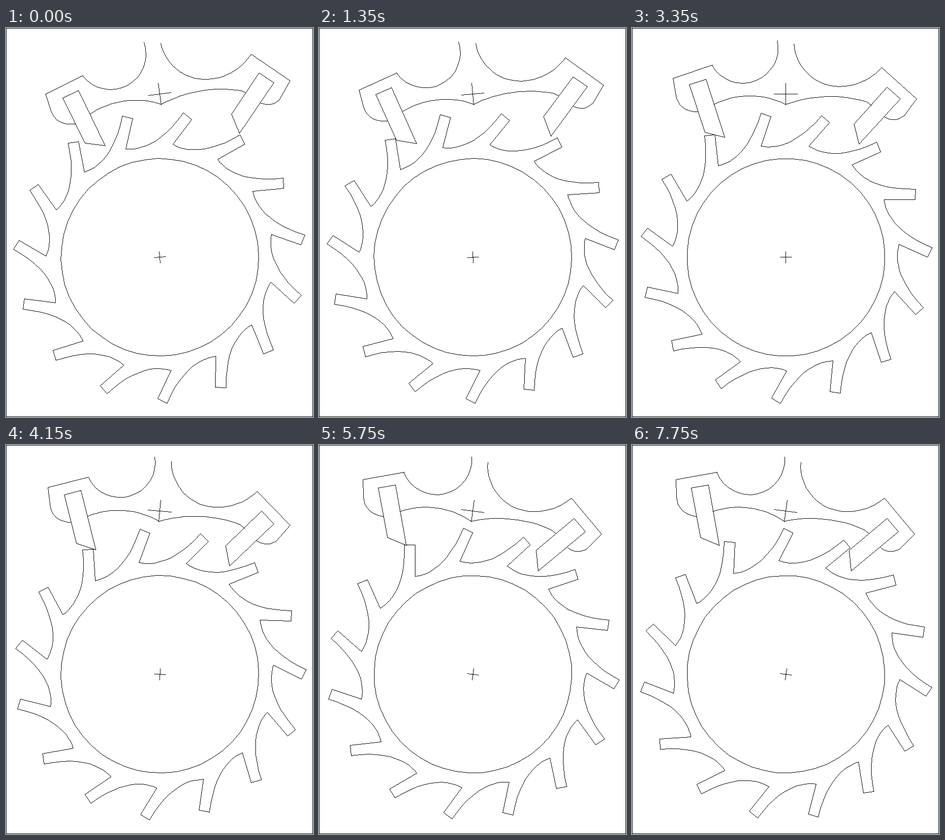
Animation, 624 px wide and 792 px high, one loop 8 s. Source, as an HTML page with a canvas:

```html
<!DOCTYPE html>
<html lang="en">
<head>
<meta charset="utf-8">
<title>Anchor escapement</title>
<style>
  html, body { margin: 0; width: 100%; height: 100%; overflow: hidden; background: #fff; }
  canvas { display: block; }
</style>
</head>
<body>
<canvas id="stage" width="624" height="792"></canvas>
<script>
const ctx = document.getElementById('stage').getContext('2d');
const LOOP = 8000, STEP = 400, FIRST_STEP = 150;
const TEETH = 15, PITCH = 360 / TEETH;
const AXLE = [312.4, 466.4], PIVOT = [312, 134];

const radians = degrees => degrees * Math.PI / 180;

function rotate([x, y], degrees) {
  const c = Math.cos(radians(degrees)), s = Math.sin(radians(degrees));
  return [x * c - y * s, x * s + y * c];
}

function sample(count, pointAt) {
  return Array.from({ length: count + 1 }, (_, i) => pointAt(i / count));
}

function arc(cx, cy, r, from, to, count = 16) {
  return sample(count, t => {
    const [x, y] = rotate([r, 0], from + (to - from) * t);
    return [cx + x, cy + y];
  });
}

// Bezier curve of any degree, by repeated interpolation
function bezier(...controls) {
  return sample(12, t => {
    let points = controls;
    while (points.length > 1) {
      points = points.slice(1).map(([x, y], i) => {
        const [px, py] = points[i];
        return [px + (x - px) * t, py + (y - py) * t];
      });
    }
    return points[0];
  });
}

const closed = points => [...points, points[0]];

function cross(x, y, w, h) {
  return [[[x - w, y], [x + w, y]], [[x, y - h], [x, y + h]]];
}

// Wheel, relative to its axle: the tip, the straight face, the hollow to the next tip
const tip = [263.4, -138.9];
const tooth = [
  tip, [263, -117.6],
  ...bezier([199.5, -117.5], [203, -89.9], [222.8, -50.3], rotate(tip, PITCH))
];
const wheel = [
  arc(0, 0, 201, 3.75, 363.75, 48),
  ...cross(0, 0, 11.5, 11.5),
  ...Array.from({ length: TEETH }, (_, k) => tooth.map(p => rotate(p, k * PITCH)))
];

// Anchor, in stage coordinates at rest
const anchor = [
  [
    ...arc(224.6, 40.2, 71.7, -12, 150.6), [163, 75], [82.6, 102],
    ...bezier([88.5, 137], [95, 169], [133, 170])
  ],
  [
    ...arc(421, 26, 92.5, 176.3, 90), ...arc(421, 3.2, 115.3, 90, 41.8), [578, 144],
    ...bezier([552.5, 178], [534, 193], [512, 180])
  ],
  arc(239, 303, 165, 243.7, 296.3),
  [...arc(402, 399, 260, 249.75, 286.8), [485.5, 156.5]],
  closed([[115.8, 114.6], [149.7, 103.7], [187.8, 222.2], [148, 211.7]]),
  closed([[518.3, 120], [545, 143.5], [461, 236], [450.5, 195]]),
  ...cross(...PIVOT, 23.6, 22)
].map(line => line.map(([x, y]) => [x - PIVOT[0], y - PIVOT[1]]));

// Steps passed within a span
const during = (step, from, to) => Math.min(Math.max(step - from, 0), to - from);

// The wheel rests while the anchor swings back
const wheelAngle = step => -5 + during(step, 0, 2) + during(step, 6, 18);

// The anchor swings freely, is pushed by a tooth, slips twice, then turns back
const anchorAngle = step => -8 + during(step, 2, 8) - during(step, 18, 20)
  + 2 * (during(step, 8, 12) + during(step, 13, 14) + during(step, 15, 16));

// One-pixel line without antialiasing
function drawLine([x0, y0], [x1, y1]) {
  const dx = x1 - x0, dy = y1 - y0;
  const count = Math.max(Math.abs(dx), Math.abs(dy), 1);
  for (let i = 0; i <= count; i++) {
    ctx.fillRect(Math.round(x0 + dx * i / count), Math.round(y0 + dy * i / count), 1, 1);
  }
}

function drawPart(lines, [cx, cy], degrees) {
  for (const line of lines) {
    const points = line.map(p => {
      const [x, y] = rotate(p, degrees);
      return [Math.round(cx + x), Math.round(cy + y)];
    });
    for (let i = 1; i < points.length; i++) drawLine(points[i - 1], points[i]);
  }
}

function draw(step) {
  ctx.fillStyle = '#000';
  ctx.fillRect(0, 0, 624, 792);
  ctx.fillStyle = '#fff';
  ctx.fillRect(1, 1, 622, 790);
  ctx.fillStyle = '#000';
  drawPart(wheel, AXLE, wheelAngle(step));
  drawPart(anchor, PIVOT, anchorAngle(step));
}

let shown = -1;
const start = performance.now();
function tick() {
  const time = (performance.now() - start) % LOOP;
  const step = Math.floor((time + STEP - FIRST_STEP) / STEP);
  if (step !== shown) draw(shown = step);
  requestAnimationFrame(tick);
}
tick();
</script>
</body>
</html>
```
